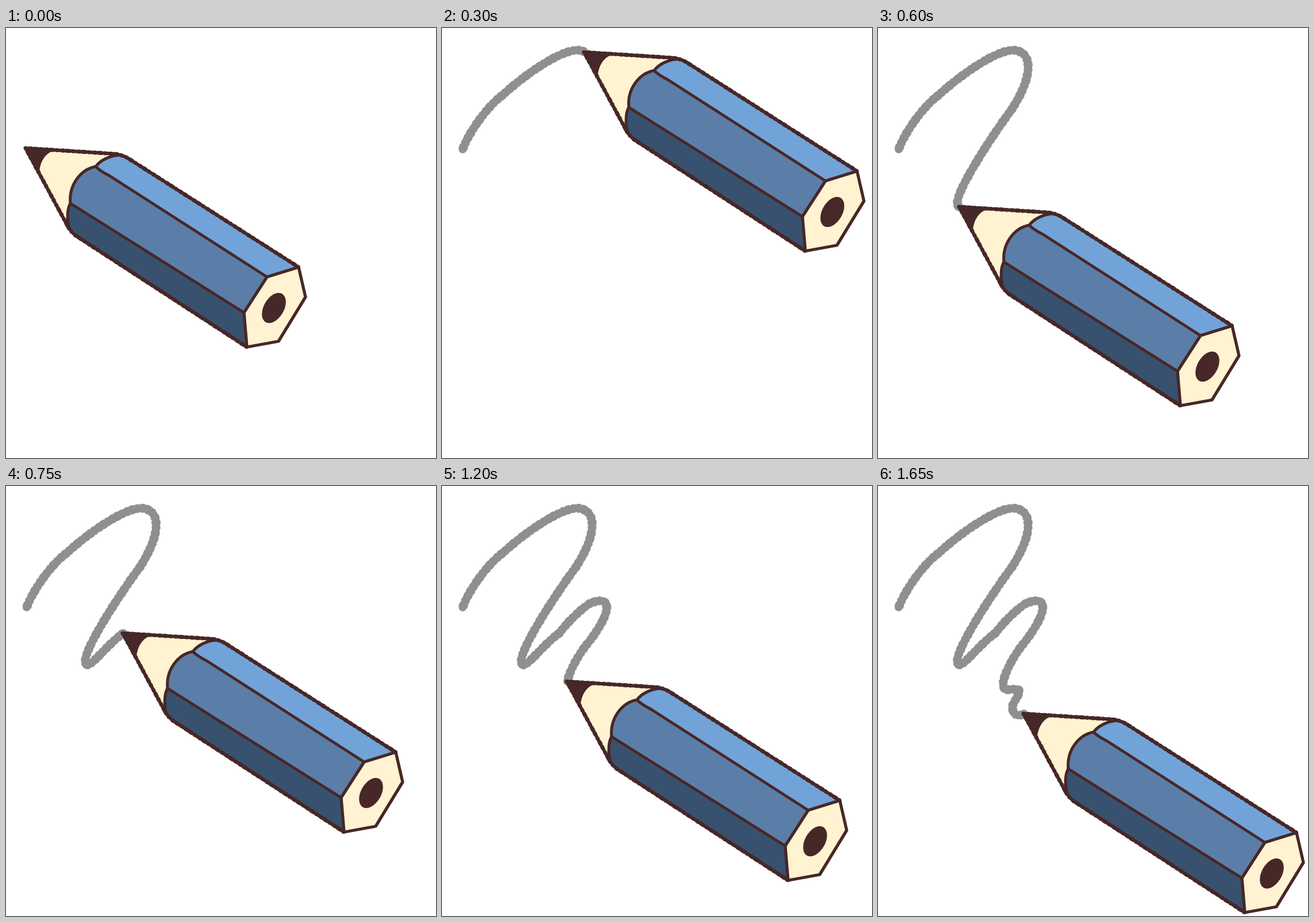
These frames come from a looping animation (748x748 px, 2250 ms). An HTML page with a canvas:

```html
<!DOCTYPE html>
<html lang="en">
<head>
<meta charset="utf-8">
<title>Scribbling pencil</title>
<style>
html, body { margin: 0; width: 100%; height: 100%; overflow: hidden; background: #fff; }
canvas { display: block; width: 748px; height: 748px; }
</style>
</head>
<body>
<canvas id="stage" width="748" height="748"></canvas>
<script>
const ctx = document.getElementById('stage').getContext('2d');
const LOOP = 2250, STEP = 150;
const INK = '#472727', CREAM = '#fff3d1', GRAPHITE = '#8f8f8f';
const LIGHT = '#72a3d8', MID = '#5b7ea8', DARK = '#38516e';
const TIP = { x: 35, y: 209 };

// One curve per step; the pencil tip rests at the end of the latest curve
const scribble = `M36 211
  C46 183 78 137 105 117
  C142 83 222 24 248 42
  C264 49 272 80 233 141
  C208 174 118 306 142 311
  C151 311 180 272 204 256
  C216 240 238 217 256 205
  C288 190 304 206 258 268
  C240 289 223 318 218 340
  C216 364 231 349 245 355
  C247 364 237 372 234 383
  C233 398 244 402 254 396`.split('\n');

function fill(path, color) {
  ctx.fillStyle = color;
  ctx.fill(new Path2D(path));
}

function line(path, width, color = INK) {
  ctx.strokeStyle = color;
  ctx.lineWidth = width;
  ctx.stroke(new Path2D(path));
}

// A solid line with uneven wider dashes, for a grainy edge
function roughLine(path, width, grain, color) {
  line(path, width, color);
  ctx.save();
  ctx.lineCap = 'butt';
  ctx.setLineDash([7, 4, 3, 6, 5, 3]);
  line(path, width + grain, color);
  ctx.restore();
}

function drawPencil() {
  const topArch = 'M156 241 C165 229 182 222 197 221 Q206 222 213 227';
  const midArch = 'M112 305 C109 274 129 246 156 241';
  const lowArch = 'M112 305 C106 315 106 333 110 349';
  const hexagon = 'M454 433 L509 416 L521 468 L474 545 L419 555 L414 495 Z';
  const outline = `M107 344 L34 209 L182 218.5 Q200 219 213 227 L509 416
    M107 344 Q112 354 121 361 L419 555`;

  fill('M34 209 L197 220 L160 300 L110 349 Z', CREAM);
  fill('M34 209 L84 213 C70 217 60 230 58 250 Z', INK);
  fill(topArch + ' L509 416 L454 433 Z', LIGHT);
  fill(midArch + ' L454 433 L414 495 Z', MID);
  fill(lowArch + ' L121 361 L419 555 L414 495 Z', DARK);
  fill(hexagon, CREAM);

  for (const arch of [topArch, midArch, lowArch]) line(arch, 5);
  line('M156 241 Q164 249 180 257 L454 433 M112 305 L414 495', 5);
  line(hexagon, 5.3);
  roughLine(outline, 5.8, 1.2, INK);

  ctx.fillStyle = INK;
  ctx.beginPath();
  ctx.ellipse(466, 487, 28.5, 17.5, -Math.PI / 3, 0, Math.PI * 2);
  ctx.fill();
}

function draw() {
  const time = performance.now() % LOOP;
  const step = Math.min(Math.floor(time / STEP), scribble.length - 1);
  const [x, y] = step ? scribble[step].split(' ').slice(-2).map(Number) : [TIP.x, TIP.y];

  ctx.fillStyle = '#fff';
  ctx.fillRect(0, 0, 748, 748);
  ctx.lineCap = ctx.lineJoin = 'round';
  if (step) roughLine(scribble.slice(0, step + 1).join(' '), 14, 1.6, GRAPHITE);

  ctx.save();
  ctx.translate(x - TIP.x, y - TIP.y);
  drawPencil();
  ctx.restore();
  requestAnimationFrame(draw);
}
draw();
</script>
</body>
</html>
```
